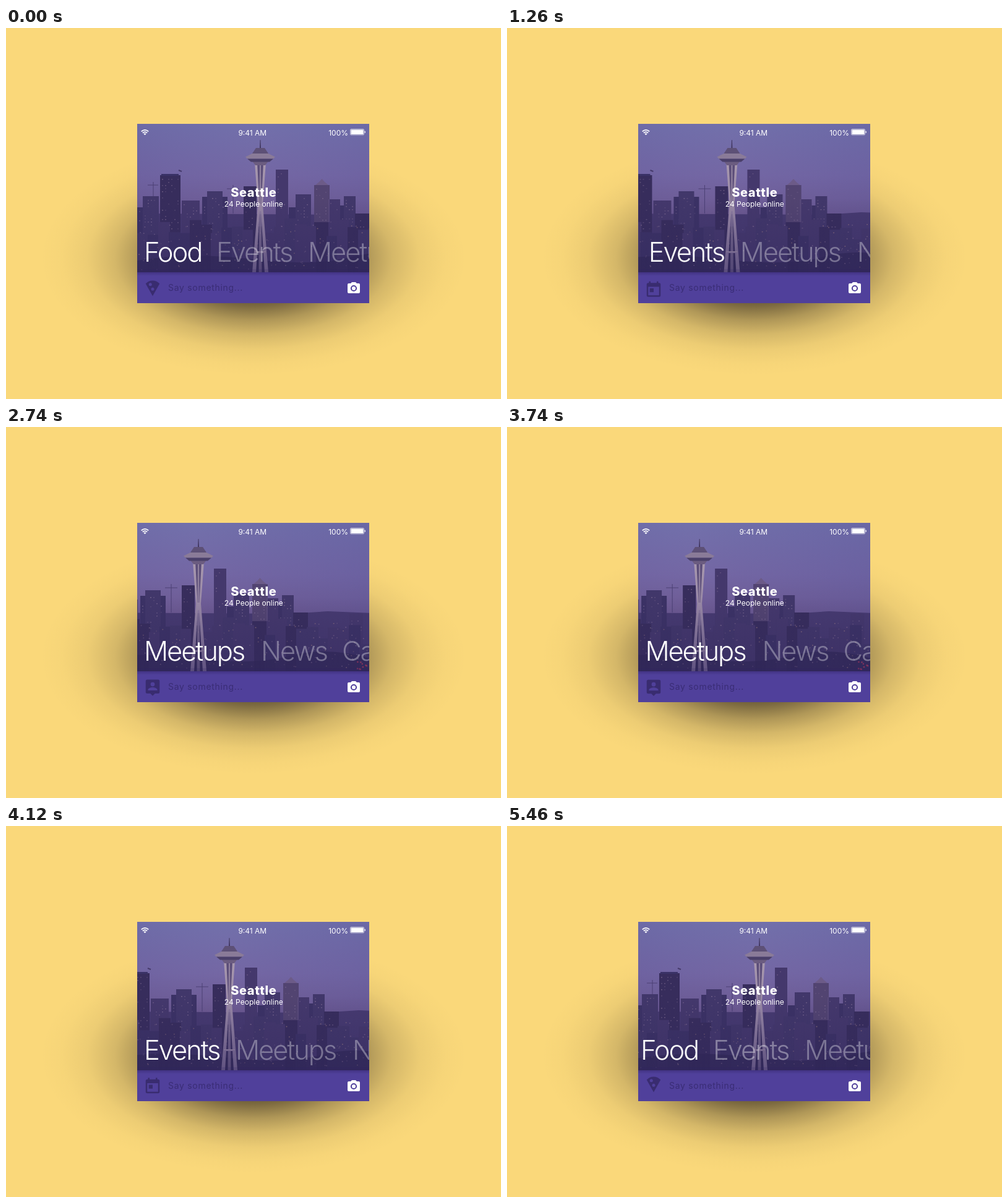
An HTML page that plays this animation: 800 px wide and 600 px high, repeating every 5480 ms.

```html
<!DOCTYPE html>
<html lang="en">
<head>
<meta charset="utf-8">
<title>City channels</title>
<style>
  html, body { margin: 0; width: 100%; height: 100%; overflow: hidden; background: #fad87a; }
  svg { display: block; }
  #stage { width: 100vw; height: 100vh; }
  text { font-family: Inter, Roboto, sans-serif; font-optical-sizing: none; fill: #fff; }
  .small { font-size: 12px; }
  .city { font-size: 20px; font-weight: 800; letter-spacing: .6px; }
  .hint { font-size: 14px; letter-spacing: .7px; fill: #3a2d76; }
  #words text { font-size: 43.5px; font-weight: 300; letter-spacing: -2.1px; }
  #icons { fill: #392c70; fill-rule: evenodd; }
</style>
</head>
<body>
<svg id="stage" viewBox="0 0 800 600">
  <defs>
    <radialGradient id="shade">
      <stop offset=".3" stop-color="#1e1814" stop-opacity=".75"/>
      <stop offset=".41" stop-color="#1e1814" stop-opacity=".57"/>
      <stop offset=".53" stop-color="#1e1814" stop-opacity=".34"/>
      <stop offset=".65" stop-color="#1e1814" stop-opacity=".17"/>
      <stop offset=".78" stop-color="#1e1814" stop-opacity=".06"/>
      <stop offset=".9" stop-color="#1e1814" stop-opacity=".015"/>
      <stop offset="1" stop-color="#1e1814" stop-opacity="0"/>
    </radialGradient>
    <linearGradient id="sky" x2="0" y2="1">
      <stop offset="0" stop-color="#7270ab"/>
      <stop offset=".35" stop-color="#7467a4"/>
      <stop offset=".6" stop-color="#6d5a92"/>
      <stop offset="1" stop-color="#5b4a82"/>
    </linearGradient>
    <linearGradient id="dusk">
      <stop offset="0" stop-color="#4d468c" stop-opacity=".15"/>
      <stop offset=".4" stop-color="#565298" stop-opacity="0"/>
      <stop offset="1" stop-color="#565298" stop-opacity=".3"/>
    </linearGradient>
    <linearGradient id="tower" x2="0" y2="1">
      <stop offset="0" stop-color="#a898ae"/>
      <stop offset="1" stop-color="#83739a"/>
    </linearGradient>
    <linearGradient id="fade" x2="0" y2="1">
      <stop offset="0" stop-color="#30265c" stop-opacity="0"/>
      <stop offset="1" stop-color="#30265c" stop-opacity=".4"/>
    </linearGradient>
    <linearGradient id="edge" x2="0" y2="1">
      <stop offset="0" stop-color="#2c2060" stop-opacity=".4"/>
      <stop offset="1" stop-color="#2c2060" stop-opacity="0"/>
    </linearGradient>
  </defs>

  <rect width="800" height="600" fill="#fad87a"/>
  <ellipse cx="400" cy="372" rx="345" ry="190" fill="url(#shade)"/>

  <svg x="212" y="155" width="375" height="240" viewBox="212 155 375 240">
    <g id="photo">
      <rect x="212" y="155" width="480" height="240" fill="url(#sky)"/>
      <rect x="212" y="155" width="480" height="240" fill="url(#dusk)"/>
      <path d="M212 300L560 302 620 298 692 301V395H212Z" fill="#463a70"/>
      <g id="skyline"></g>
      <path d="M229 254H246M238 249V272M357 260H377M367 254V300" stroke="#4c4075" fill="none"/>
      <path d="M279 230l5 2" stroke="#463b6c" stroke-width="2"/>
      <path d="M410 194L410.600 181H411.400L412 194Z" fill="#40365f"/>
      <path d="M404 218H418L415 285H407.500Z" fill="#5a4c78"/>
      <g fill="url(#tower)">
        <path d="M402 218L407 286 398 395H404L410 296H412L418 395H424L415 286 420 218H416L412.500 284H409.500L406 218Z"/>
        <path d="M410 218H412L413.500 395H408.500Z" opacity=".7"/>
        <path d="M402 361H420V364H402Z"/>
      </g>
      <path d="M397 214H425L419 222H403Z" fill="#6b5c80"/>
      <path d="M404 194H418L424 203H398Z" fill="#5d5076"/>
      <path d="M398 203H424L435 208.500 432 211.500H390L387 208.500Z" fill="#8a7b98"/>
      <path d="M390 211.500H432L426 216.500H396Z" fill="#4a3f69"/>
      <g id="lights"></g>
    </g>
    <rect x="212" y="275" width="375" height="120" fill="url(#fade)"/>
    <g id="words"></g>
  </svg>

  <g fill="none" stroke="#fff" stroke-width="1.700">
    <path d="M218.700 167.300Q224.500 162.300 230.300 167.300M220.800 169.700Q224.500 166.500 228.200 169.700"/>
    <path d="M222.300 171L224.500 173.300 226.700 171Q224.500 169.300 222.300 171Z" fill="#fff" stroke="none"/>
  </g>
  <text class="small" x="398.300" y="174" text-anchor="middle">9:41 AM</text>
  <text class="small" x="553" y="174" text-anchor="end">100%</text>
  <rect x="556.500" y="163.500" width="22" height="9.500" rx="1.500" fill="none" stroke="#fff" stroke-opacity=".6"/>
  <rect x="557.500" y="164.500" width="20" height="7.500" fill="#fff"/>
  <rect x="579.500" y="166.500" width="1.500" height="3.500" rx=".7" fill="#fff" opacity=".8"/>
  <text class="city" x="400.300" y="273" text-anchor="middle">Seattle</text>
  <text class="small" x="400.300" y="289" text-anchor="middle">24 People online</text>

  <rect x="212" y="390" width="375" height="5" fill="#2c2060" opacity=".16"/>
  <svg x="212" y="395" width="375" height="50" viewBox="212 395 375 50">
    <rect x="212" y="395" width="375" height="50" fill="#50409b"/>
    <rect x="212" y="395" width="375" height="6" fill="url(#edge)"/>
    <g id="icons">
      <path d="M12 2C8.430 2 5.230 3.540 3 6L12 22 21 6C18.780 3.550 15.570 2 12 2ZM7 7a2 2 0 1 1 4 0a2 2 0 1 1-4 0ZM10 13a2 2 0 1 1 4 0a2 2 0 1 1-4 0Z"/>
      <path d="M19 3H18V1H16V3H8V1H6V3H5Q3 3 3 5V19Q3 21 5 21H19Q21 21 21 19V5Q21 3 19 3ZM19 19H5V8H19ZM7 10H12V15H7Z"/>
      <path d="M19 2H5Q3 2 3 4V18Q3 20 5 20H9L12 23 15 20H19Q21 20 21 18V4Q21 2 19 2ZM9.300 8a2.700 2.700 0 1 1 5.400 0a2.700 2.700 0 1 1-5.400 0ZM18 16H6V15.100C6 13.100 10 12 12 12S18 13.100 18 15.100Z"/>
    </g>
    <text class="hint" x="262" y="425">Say something...</text>
    <g transform="translate(550 409)" fill="#fff">
      <path d="M9 2L7.200 4H4Q2 4 2 6V18Q2 20 4 20H20Q22 20 22 18V6Q22 4 20 4H16.800L15 2Z"/>
      <circle cx="12" cy="12" r="4.100" stroke="#50409b" stroke-width="2"/>
    </g>
  </svg>
</svg>

<script>
const LOOP = 5480, STEP = 20, SLIDE = 400;
const ICON_PITCH = 50, PHOTO_SHIFT = 50;
const labels = ['Food', 'Events', 'Meetups', 'News', 'Cars'];
const offsets = [0, 117, 265, 454, 585];
// start, end, from page, to page, head start in ms
const slides = [
  [1000, 1360, 0, 1, 30],
  [2360, 2740, 1, 2, 20],
  [3740, 4120, 2, 1, 28],
  [5120, 5480, 1, 0, 30]
];

const byId = id => document.getElementById(id);
function add(parent, tag, attrs) {
  const node = document.createElementNS('http://www.w3.org/2000/svg', tag);
  for (const key in attrs) node.setAttribute(key, attrs[key]);
  return parent.appendChild(node);
}

let seed = 17;
function random() {
  seed = (seed * 16807) % 2147483647;
  return seed / 2147483647;
}

function buildCity() {
  const skyline = byId('skyline'), lights = byId('lights');
  // left, right, top
  const blocks = [
    [212, 222, 290], [221, 247, 272], [249, 282, 238], [284, 313, 279],
    [317, 358, 273], [325, 350, 264], [384, 405, 256], [436, 456, 229],
    [457, 468, 290], [468, 493, 269], [498, 523, 254], [521, 540, 277],
    [540, 553, 287], [546, 565, 272], [564, 588, 300], [655, 677, 302]
  ];
  const fills = ['#3b3265', '#41376a', '#372d5c', '#44386c'];
  blocks.forEach(([left, right, top], i) => {
    add(skyline, 'rect', { x: left, y: top, width: right - left, height: 395 - top, fill: fills[i % 4] });
    for (let y = top + 6; y < 350; y += 5)
      for (let x = left + 3; x < right - 3; x += 5)
        if (random() < .25)
          add(skyline, 'rect', { x, y, width: 2, height: 1.5, fill: '#a48caa', opacity: .15 + random() * .3 });
  });
  add(skyline, 'path', { d: 'M500 254L506 249 510.500 244 515 249 521 254Z', fill: '#6c5b88' });
  add(skyline, 'rect', { x: 498, y: 254, width: 25, height: 60, fill: '#7a6792', opacity: .4 });
  add(skyline, 'rect', { x: 251, y: 236, width: 28, height: 3, fill: '#3a3266' });
  for (let x = 212; x < 692; x += 17) {
    const top = (x < 590 ? 306 : 320) + random() * 32;
    add(skyline, 'rect', { x, y: top, width: 19, height: 395 - top, fill: fills[Math.floor(random() * 4)] });
  }
  add(skyline, 'path', { d: 'M212 376Q300 362 400 374T560 370T692 375V395H212Z', fill: '#2f2754', opacity: .75 });
  for (let i = 0; i < 170; i++)
    add(lights, 'rect', {
      x: 212 + random() * 478, y: 315 + random() * 75, width: 1.7, height: 1.5,
      fill: i % 4 ? '#9d84a0' : '#c39a8d', opacity: .2 + random() * .4
    });
  for (let i = 0; i < 9; i++)
    add(lights, 'circle', { cx: 668 + random() * 20, cy: 380 + random() * 12, r: 1.3, fill: '#c83d5c', opacity: .8 });
}

// cubic-bezier(.25, .1, .25, 1)
function ease(x) {
  if (x <= 0) return 0;
  if (x >= 1) return 1;
  const curve = (a, b, s) => 3 * a * s * (1 - s) ** 2 + 3 * b * s * s * (1 - s) + s ** 3;
  let low = 0, high = 1;
  for (let i = 0; i < 24; i++) {
    const mid = (low + high) / 2;
    if (curve(.25, .25, mid) < x) low = mid; else high = mid;
  }
  return curve(.1, 1, low);
}

function pageAt(time) {
  let page = 0;
  for (const [start, end, from, to, lead] of slides) {
    if (time < start) break;
    if (time >= end) { page = to; continue; }
    const u = (time - start + lead) / SLIDE;
    page = to > from ? from + ease(u) : to + ease(1 - u);
  }
  return page;
}

buildCity();
const words = labels.map((label, i) => {
  const node = add(byId('words'), 'text', { x: 223 + offsets[i], y: 378 });
  node.textContent = label;
  return node;
});
const icons = [...byId('icons').children];

function draw(now) {
  const time = Math.floor((now % LOOP) / STEP) * STEP;
  const page = pageAt(time);
  const base = Math.min(1, Math.floor(page));
  const scroll = offsets[base] + (offsets[base + 1] - offsets[base]) * (page - base);
  byId('photo').setAttribute('transform', `translate(${-PHOTO_SHIFT * page} 0)`);
  byId('words').setAttribute('transform', `translate(${-scroll} 0)`);
  words.forEach((word, i) =>
    word.setAttribute('fill-opacity', 1 - .66 * Math.min(1, Math.abs(i - page))));
  icons.forEach((icon, i) =>
    icon.setAttribute('transform', `translate(222 ${406 + ICON_PITCH * (i - page)}) scale(1.25)`));
}

const begin = performance.now();
function tick() {
  draw(performance.now() - begin);
  requestAnimationFrame(tick);
}
tick();
</script>
</body>
</html>
```
